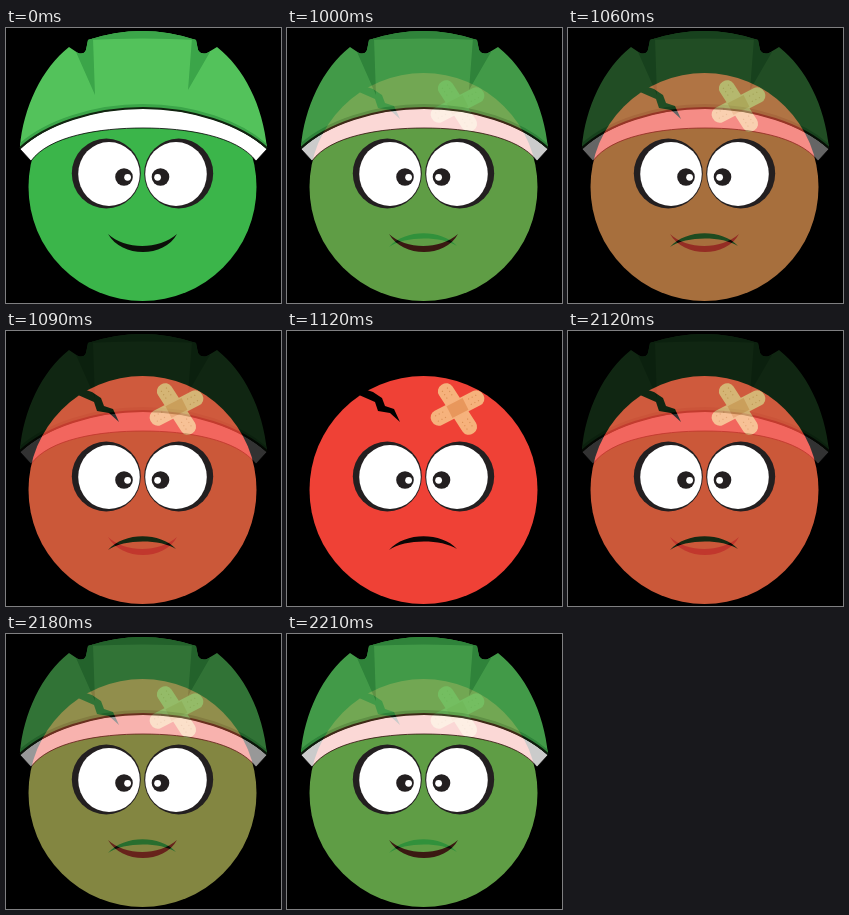
These frames come from a looping animation (275x275 px, 2240 ms). An HTML page:

```html
<!DOCTYPE html>
<html lang="en">
<head>
<meta charset="utf-8">
<title>Helmet mood</title>
<style>
  html, body { margin: 0; width: 100%; height: 100%; overflow: hidden; background: #000; }
  svg { display: block; width: 100%; height: 100%; }
  .sad { opacity: 0; animation: fade 2240ms step-end infinite; }
  /* Four 30 ms steps each way between two one-second holds */
  @keyframes fade {
    0% { opacity: 0; }
    44.64% { opacity: .2; }
    45.98% { opacity: .4; }
    47.32% { opacity: .6; }
    48.66% { opacity: .8; }
    50% { opacity: 1; }
    94.64% { opacity: .8; }
    95.98% { opacity: .6; }
    97.32% { opacity: .4; }
    98.66% { opacity: .2; }
    100% { opacity: 0; }
  }
</style>
</head>
<body>
<svg viewBox="0 0 275 275">
  <defs>
    <g id="eyes">
      <ellipse cx="100.3" cy="145.5" rx="34.5" ry="35" fill="#231f20"/>
      <ellipse cx="103" cy="146" rx="30.8" ry="32" fill="#fff"/>
      <ellipse cx="172.7" cy="145.5" rx="34.5" ry="35" fill="#231f20"/>
      <ellipse cx="170" cy="146" rx="30.8" ry="32" fill="#fff"/>
      <g fill="#231f20">
        <circle cx="118" cy="149" r="8.8"/>
        <circle cx="154.5" cy="149" r="8.8"/>
      </g>
      <g fill="#fff">
        <circle cx="121.6" cy="149.3" r="3.4"/>
        <circle cx="151.6" cy="149.3" r="3.4"/>
      </g>
    </g>
    <g id="strip">
      <rect x="-29" y="-8" width="58" height="16" rx="7.5" fill="#f6b27c"/>
      <g stroke="#dd9359" stroke-width="1.4" stroke-linecap="round" stroke-dasharray="0 4">
        <path d="M-23-3H-13M-23 3H-13M14-3H24M14 3H24"/>
      </g>
    </g>
    <clipPath id="shell">
      <path d="M14 119C17 80 36 40 63 19L72 25Q78 27 80 22L82 12Q136-6 190 12L192 22Q195 27 201 25L211 19C238 40 257 78 261 120C234 96 186 80 137 80S40 96 14 119Z"/>
    </clipPath>
  </defs>

  <g class="happy">
    <circle cx="136.5" cy="159" r="114" fill="#3bb54a"/>
    <use href="#eyes"/>
    <path d="M102 206C119 222 153 222 171 206C158 230 116 230 102 206Z" fill="#0c1009"/>
    <path d="M14 121C40 96 88 80 137 80S234 96 261 121L250 133C231 108 181 100 137 100S43 108 25 133Z" fill="#fff" stroke="#000" stroke-width=".8"/>
    <g clip-path="url(#shell)">
      <path d="M0 0H275V130H0Z" fill="#53c25b"/>
      <g fill="#3ba549">
        <path d="M80 0H192V12Q137 9 80 12Z"/>
        <path d="M70 24L89 67L87 10H78V22Z"/>
        <path d="M204 24L182 62L186 10H196V22Z"/>
      </g>
      <path d="M14 119C40 95 88 79 137 79S234 95 261 120" fill="none" stroke="#3ba549" stroke-width="6"/>
    </g>
    <path d="M14 120C40 96 88 80 137 80S234 96 261 120" fill="none" stroke="#10240f" stroke-width="2.2"/>
  </g>

  <g class="sad">
    <rect width="275" height="275"/>
    <circle cx="136.5" cy="159" r="114" fill="#ef4136"/>
    <path d="M74 57L86 61L95 67L98 75L107 78L113 91L103 82L91 80L88 71L72 64Z"/>
    <use href="#strip" transform="translate(170.5 78) rotate(57)"/>
    <use href="#strip" transform="translate(170.5 77) rotate(-27)"/>
    <rect x="-9" y="-6.5" width="18" height="13" fill="#e8975c" transform="translate(170.5 77) rotate(-27)"/>
    <use href="#eyes"/>
    <path d="M102 219C118 201 154 201 170 218C154 208 118 208 102 219Z" fill="#0c0605"/>
  </g>
</svg>
</body>
</html>
```
